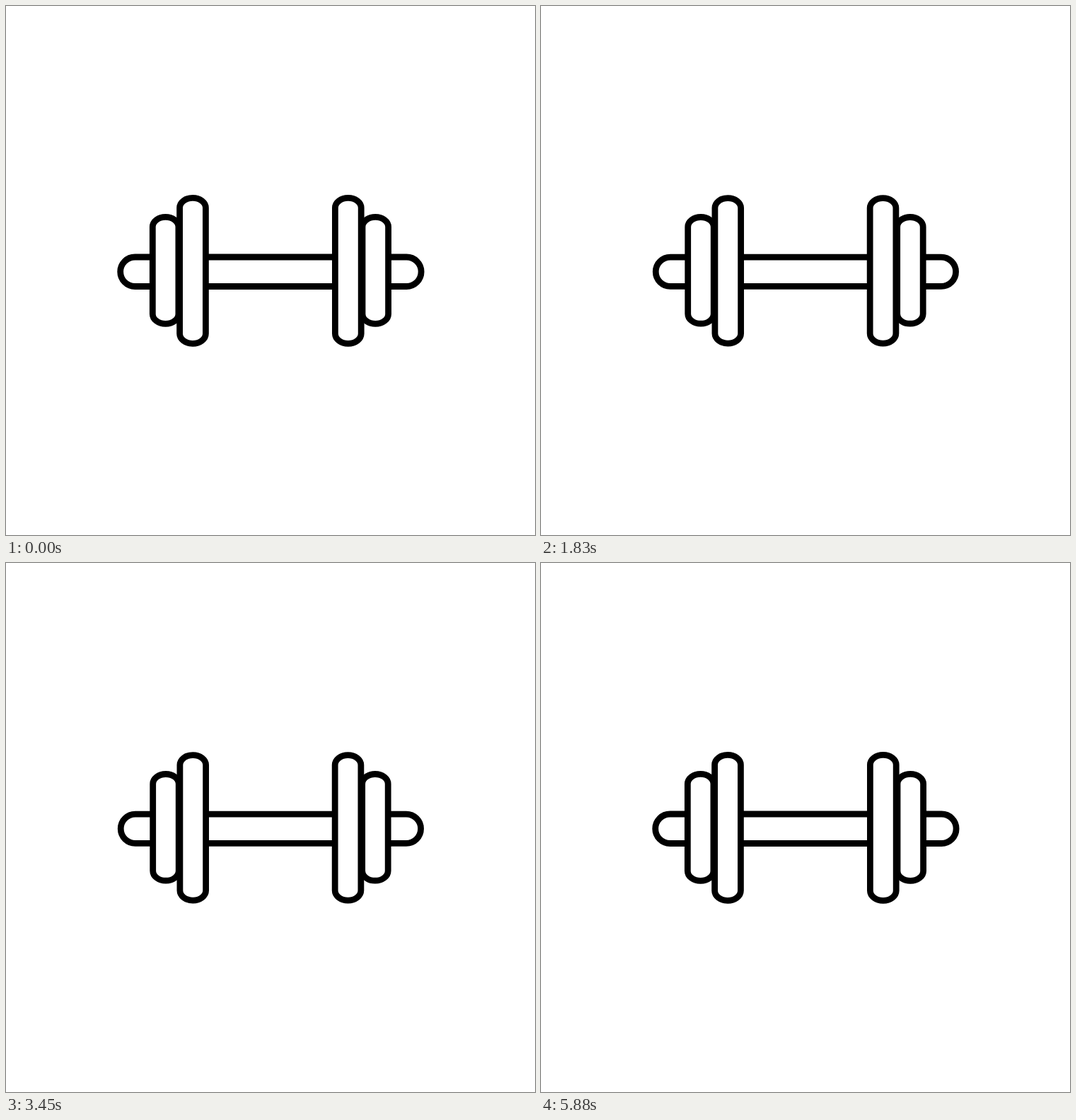
An HTML page for the animation above (6.03 s loop, 748 px wide and 748 px high).

```html
<!DOCTYPE html>
<html lang="en">
<head>
<meta charset="utf-8">
<title>Dumbbell</title>
<style>
  html, body { margin: 0; height: 100%; overflow: hidden; background: #fff; }
  svg { display: block; width: 100vw; height: 100vh; }
</style>
</head>
<body>
<svg viewBox="0 0 748 748">
  <g id="dumbbell" fill="#fff" stroke="#000" stroke-width="8.8">
    <rect x="161.7" y="355" width="425.4" height="41.5" rx="20.7"/>
    <rect x="207.3" y="298.3" width="36.6" height="151.1" rx="18.3" ry="14"/>
    <rect x="504" y="298.3" width="36.6" height="151.1" rx="18.3" ry="14"/>
    <rect x="245.6" y="271.3" width="36.8" height="206" rx="18.4" ry="14"/>
    <rect x="465.4" y="271.3" width="36.8" height="206" rx="18.4" ry="14"/>
  </g>
</svg>
<script>
  const LOOP = 6030, STEP = 30, BEAT = 20, PULSE = 16, DEPTH = 0.065;
  const dumbbell = document.getElementById("dumbbell");
  const start = performance.now();

  // Each beat shrinks and recovers over PULSE steps, then rests.
  function draw() {
    const time = (performance.now() - start) % LOOP;
    const step = Math.min(Math.floor(time / STEP) % BEAT, PULSE);
    const scale = 1 - DEPTH * (1 - Math.cos(2 * Math.PI * step / PULSE)) / 2;
    dumbbell.setAttribute("transform",
      `translate(374.3 374.3) scale(${scale}) translate(-374.3 -374.3)`);
    requestAnimationFrame(draw);
  }
  draw();
</script>
</body>
</html>
```
